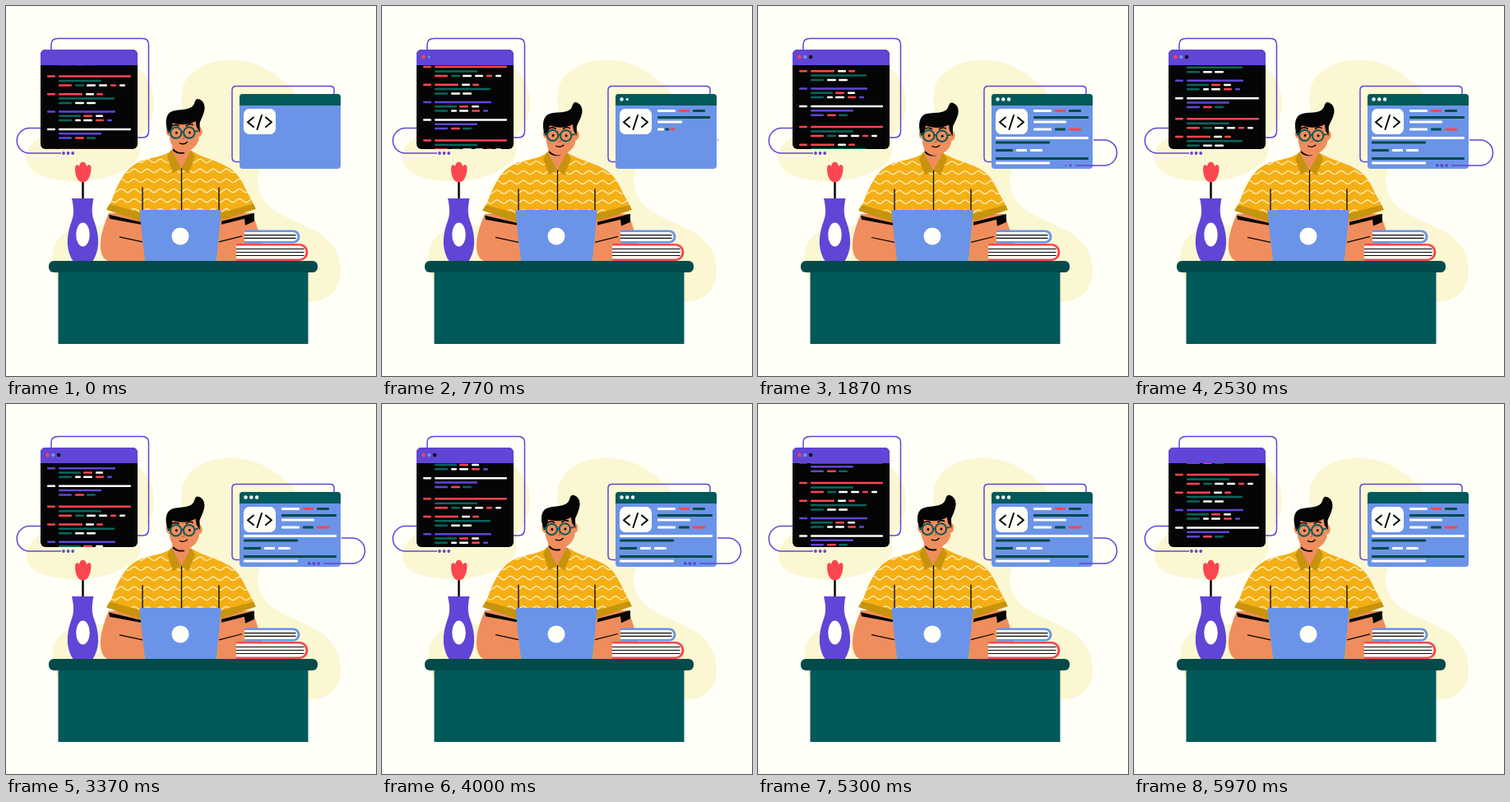
Write an HTML page with a canvas that moves like this. It is 450 by 450 pixels and loops after 6.01 s.

```html
<!DOCTYPE html>
<html lang="en">
<head>
<meta charset="utf-8">
<title>Coder at a desk</title>
<style>
html, body { margin: 0; width: 100%; height: 100%; overflow: hidden; background: #fffff8; }
canvas { display: block; width: 100vw; height: 100vh; }
</style>
</head>
<body>
<canvas id="stage" width="450" height="450"></canvas>
<script>
const ctx = document.getElementById('stage').getContext('2d');
const LOOP = 6010;
const CODE_HEIGHT = 89.5;
const C = {
  paper: '#fffff8', blob: '#faf7d2', purple: '#6145d6', blue: '#6b94e8', teal: '#02595a',
  deep: '#034a4a', red: '#fc4650', black: '#050505', skin: '#f08d5d', shirt: '#f4af15',
  cuff: '#c8940d', white: '#fffffa', green: '#08665e'
};

const clamp = v => Math.max(0, Math.min(1, v));
const ramp = (t, from, to) => clamp((t - from) / (to - from));
const easeOut = v => 1 - (1 - v) * (1 - v);
const smooth = v => v * v * (3 - 2 * v);

function fill(d, color) {
  ctx.fillStyle = color;
  ctx.fill(new Path2D(d));
}

function stroke(d, color, width = 1.5) {
  ctx.strokeStyle = color;
  ctx.lineWidth = width;
  ctx.stroke(new Path2D(d));
}

function box(x, y, w, h, r, color) {
  ctx.fillStyle = color;
  ctx.beginPath();
  ctx.roundRect(x, y, w, h, r);
  ctx.fill();
}

function dot(x, y, r, color, ry = r) {
  if (r <= 0) return;
  ctx.fillStyle = color;
  ctx.beginPath();
  ctx.ellipse(x, y, r, ry, 0, 0, Math.PI * 2);
  ctx.fill();
}

function group(draw) {
  ctx.save();
  draw();
  ctx.restore();
}

// Each row: y offset, then colour key, start and end of every dash
const codeRows = [
  [0, 'red', 50, 60, 'red', 64, 152],
  [5.5, 'green', 64, 116],
  [11, 'red', 64, 80, 'green', 84, 95, 'white', 98, 109, 'white', 113, 123, 'red', 127, 134, 'white', 138, 145],
  [21.8, 'red', 50, 60, 'red', 64, 93, 'white', 97, 107, 'red', 110, 118],
  [27, 'green', 64, 132],
  [32.5, 'green', 64, 80, 'white', 84, 95, 'white', 98, 109],
  [43, 'purple', 50, 60, 'purple', 64, 133],
  [48.3, 'green', 64, 91, 'red', 94, 105, 'white', 109, 118],
  [53.5, 'green', 64, 80, 'white', 84, 91, 'white', 94, 105, 'red', 109, 119, 'purple', 123, 129],
  [64.5, 'white', 50, 60, 'white', 64, 152],
  [69.8, 'purple', 64, 116],
  [75.2, 'purple', 64, 80, 'red', 84, 95, 'green', 98, 109]
];

const pageRows = [
  [127.5, 'white', 335, 357, 'red', 361, 374, 'deep', 378, 393],
  [135.5, 'deep', 335, 402],
  [141, 'white', 335, 375],
  [150, 'white', 335, 357, 'deep', 361, 374, 'red', 378, 393],
  [160.5, 'white', 289, 402],
  [166, 'deep', 289, 355],
  [175.5, 'deep', 289, 310, 'white', 314, 327, 'white', 331, 346],
  [185.5, 'deep', 289, 402],
  [191, 'white', 289, 355]
];

function dashes(row, y, thick, scale = 1) {
  const left = row[2];
  for (let i = 1; i < row.length; i += 3) {
    const x = left + (row[i + 1] - left) * scale;
    box(x, y - thick / 2, (row[i + 2] - row[i + 1]) * scale, thick, 1, C[row[i]]);
  }
}

// Header buttons pop in one by one and shrink before the loop ends
function buttonScale(t, i) {
  const out = ramp(t, 5700 - i * 100, 5985 - i * 100);
  return easeOut(ramp(t, 520 + i * 120, 800 + i * 120)) * (1 - out);
}

function backdrop() {
  ctx.fillStyle = C.paper;
  ctx.fillRect(0, 0, 450, 450);
  fill('M25 184C25 160 55 158 66 135C80 107 94 72 137 70C169 69 184 100 179 128C175 151 158 158 163 174C166 193 128 213 88 213C52 213 25 205 25 184Z', C.blob);
  fill('M57 316C53 286 70 268 105 268C170 265 242 235 227 170C220 142 211 126 214 103C219 77 248 64 279 66C309 68 326 81 344 97C371 122 353 160 323 181C299 200 302 229 323 246C351 267 391 270 403 302C415 333 400 360 368 360H70Z', C.blob);
}

function codeWindow(t) {
  stroke('M55 53V47Q55 39.5 63 39.5H166Q173.5 39.5 173.5 47V152Q173.5 160 166 160H160', C.purple);
  stroke('M42 148.5H28.5A15.25 15.25 0 0 0 28.5 179H67', C.purple);
  for (let i = 0; i < 3; i++) dot(70 + i * 5.6, 179, 1.9, C.purple);

  group(() => {
    ctx.beginPath();
    ctx.roundRect(42, 53, 118, 121, 6);
    ctx.clip();
    box(42, 53, 118, 121, 0, C.black);
    const top = 85.4 - t / LOOP * CODE_HEIGHT;
    for (let n = -1; n < 3; n++) {
      for (const row of codeRows) {
        const y = top + n * CODE_HEIGHT + row[0];
        if (y > 68 && y < 177) dashes(row, y, 2.5);
      }
    }
    box(42, 53, 118, 19, 0, C.purple);
  });
  [C.red, C.blue, C.black].forEach((c, i) => dot(50.5 + i * 6.8, 62, 2.2 * buttonScale(t, i), c));
}

function pageWindow(t) {
  stroke('M284 189.5H280Q275 189.5 275 184V102Q275 97.5 280 97.5H394Q399 97.5 399 102V107', C.purple);

  group(() => {
    ctx.beginPath();
    ctx.roundRect(284, 107, 123, 91, 4);
    ctx.clip();
    box(284, 107, 123, 91, 0, C.blue);
    box(284, 107, 123, 14, 0, C.teal);
  });
  for (let i = 0; i < 3; i++) dot(291.5 + i * 6.8, 113.5, 2.2 * buttonScale(t, i), C.white);

  box(289, 125, 39, 31, 7, C.white);
  group(() => {
    ctx.lineCap = ctx.lineJoin = 'round';
    stroke('M301 135.5L294 141.3L301 147M311 133L305.5 150M316 135.5L323 141.3L316 147', C.black, 2);
  });

  pageRows.forEach((row, i) => {
    const s = easeOut(ramp(t, 330 + i * 120, 730 + i * 120));
    if (s > 0) dashes(row, row[0], 3, s);
  });

  const shown = smooth(ramp(t, 730, 1400)) * (1 - smooth(ramp(t, 5200, 5960)));
  if (shown > 0) group(() => {
    const length = 13 + Math.PI * 15.5 + 35;
    ctx.setLineDash([length * shown, length * 2]);
    stroke('M408 163H421A15.5 15.5 0 0 1 421 194H386', C.purple);
  });
  for (let i = 0; i < 3; i++) {
    const s = ramp(t, 1600 + i * 80, 1950 + i * 80) * (1 - ramp(t, 5050 + i * 50, 5250 + i * 50));
    dot(380 - i * 5.6, 194, 1.9 * s, C.purple);
  }
}

// One slow sway per loop, lingering at both ends: 1 is low and right, -1 high and left
function swayAt(t) {
  return Math.tanh(2 * Math.sin((t - 150) / LOOP * Math.PI * 2)) / Math.tanh(2);
}

function waves() {
  ctx.strokeStyle = '#fff3c8';
  ctx.lineWidth = 1.2;
  for (let y = 189; y < 275; y += 12) {
    ctx.beginPath();
    for (let x = 118; x <= 308; x += 2) {
      ctx.lineTo(x, y + 2.2 * Math.sin(x * Math.PI / 8));
    }
    ctx.stroke();
  }
}

function torso(sway) {
  ctx.translate(0, 311);
  ctx.scale(1, 1 - 0.016 * sway);
  ctx.translate(0, -311);
  fill('M125 252C119 266 114 282 115 294C116 306 121 311 130 311H285C302 311 312 304 311 292C310 279 304 266 300 252Z', C.skin);
  fill('M125 254L164 263V266L126 259Z', C.black);
  fill('M262 262L302 252L302 262L291 267L290 259L262 266Z', C.black);

  const shirt = 'M201 177C189 185 173 185 160 191C146 198 139 212 133 225L126 243L166 257L168 311H257L260 257L302 243L292 224C286 211 280 201 267 195C255 188 240 186 226 177Z';
  fill(shirt, C.shirt);
  group(() => {
    ctx.clip(new Path2D(shirt));
    waves();
  });
  fill('M126 241L166 252L164 262L122 248Z', C.cuff);
  fill('M301 241L304 247L262 261L260 252Z', C.cuff);
  stroke('M166 221V252M259 221V250', C.black, 1.3);
  fill('M202 170L224 170L224 185L213 199L203 187Z', C.skin);
  stroke('M203 175Q208 181 217 179', C.black, 2);
  fill('M201 175L213 198L203 204L196 184Z', C.cuff);
  fill('M225 176L230 184L222 204L213 198Z', C.cuff);
  stroke('M213.5 198V249', C.black, 1.3);
  stroke('M138 281L166 287M259 287L287 280', C.black, 1.2);
}

function head(sway) {
  ctx.translate(213, 178 + 2.9 * sway);
  ctx.rotate(0.03 * sway);
  ctx.translate(-213, -178);
  dot(199, 153, 4, C.skin, 6);
  dot(235, 154, 4, C.skin, 6);
  fill('M199 138H235V160C235 170 224 179 215 179C206 179 200 171 199 160Z', C.skin);
  fill('M198 156C194 146 194 137 198 132C204 125 218 129 226 124C231 121 229 116 233 114C239 114 243 120 242 127C241 133 238 138 236 143L236 155L232 148L231 141C222 146 212 146 203 143L202 149Z', C.black);
  stroke('M202 147Q206 144 211 147M219 147Q224 143 228 146', C.black, 1.6);
  for (const x of [207, 223]) {
    ctx.beginPath();
    ctx.arc(x, 155, 6.7, 0, Math.PI * 2);
    ctx.strokeStyle = C.teal;
    ctx.lineWidth = 2;
    ctx.stroke();
    dot(x + 0.5, 155, 1.5, C.black);
  }
  stroke('M213.5 155Q215 153 216.5 155M200.5 154L197 153M229.5 154L234 153', C.teal, 1.8);
  stroke('M215 156L217 162L214 163', '#c95c36', 1);
  stroke('M211 167.5Q217 170.5 221 166', C.black, 1.3);
}

function laptop() {
  fill('M165 248H259Q262 248 261.5 251L256 311H169L162.5 251Q162 248 165 248Z', C.blue);
  dot(212, 280, 10.5, C.white);
}

function vase() {
  stroke('M93.5 211V236', C.black, 2.5);
  fill('M84 198C84 193 87 192 89 195C90 188 97 188 98 195C101 192 104 193 103.5 198C103 206 100 214.5 93.5 214.5C87 214.5 84 206 84 198Z', C.red);
  fill('M80 234H106.5C104 247 104 254 108 264C114 281 114 298 105 311H82C73 298 73 281 79 264C83 254 83 247 80 234Z', C.purple);
  dot(93.5, 278, 8.3, C.white, 14.5);
}

function book(x, y, w, h, lines, color) {
  box(x, y, w, h, [1, h / 2, h / 2, 1], color);
  box(x, y + 2.5, w - 3, h - 5, [0, h / 2 - 2.5, h / 2 - 2.5, 0], C.white);
  for (let i = 1; i <= lines; i++) {
    const ly = y + 2.5 + (h - 5) * i / (lines + 1);
    stroke(`M${x} ${ly}H${x + w - 5}`, C.black, 1.2);
  }
}

function desk() {
  box(63.5, 320, 304, 91, 0, C.teal);
  box(52, 310, 327, 14, 6, C.deep);
}

function draw(t) {
  const sway = swayAt(t);
  backdrop();
  codeWindow(t);
  pageWindow(t);
  group(() => torso(sway));
  group(() => head(sway));
  laptop();
  vase();
  book(290, 272.5, 67.5, 16, 2, C.blue);
  book(280, 289, 87.5, 21, 3, C.red);
  desk();
}

function tick() {
  draw(performance.now() % LOOP);
  requestAnimationFrame(tick);
}
tick();
</script>
</body>
</html>
```
